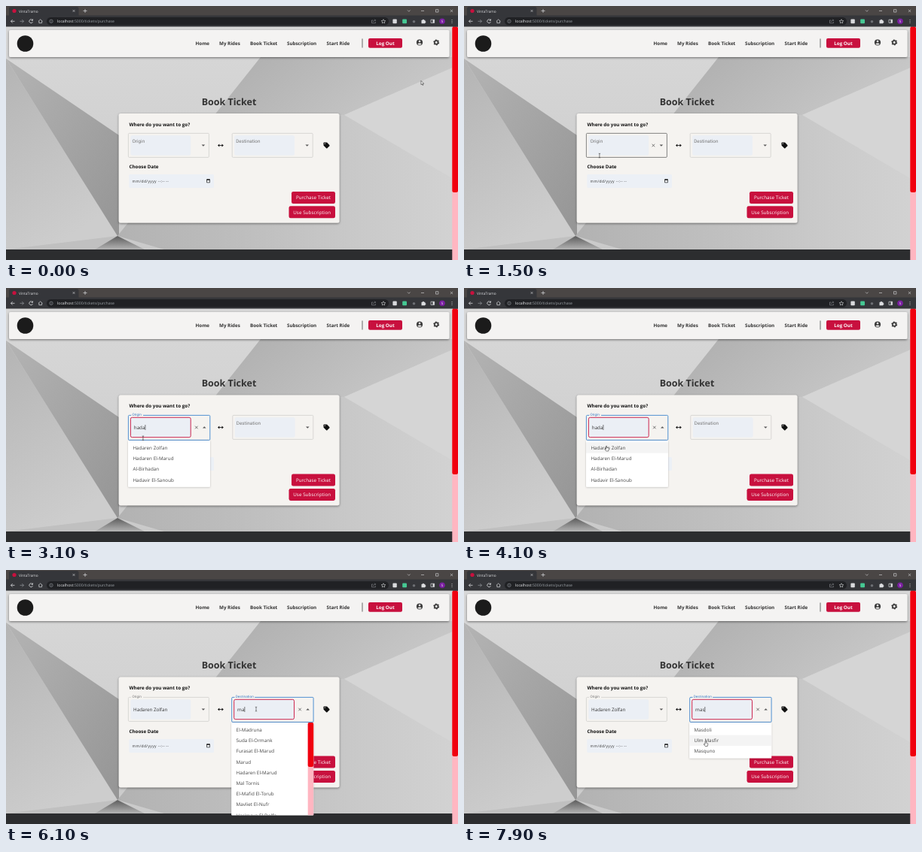
An HTML page for the animation above (8 s loop, 600x338 px).

```html
<!DOCTYPE html>
<html lang="en">
<head>
<meta charset="utf-8">
<title>Book Ticket</title>
<style>
html, body { margin: 0; width: 100%; height: 100%; overflow: hidden; background: #202124; }
svg { display: block; width: 100vw; height: 100vh; }
text { font: 6.25px "Open Sans", sans-serif; white-space: pre; text-rendering: geometricPrecision; }
.b { font-weight: 700; }
.r { font-family: Roboto, sans-serif; letter-spacing: .00938em; }
.m { letter-spacing: .00938em; }
</style>
</head>
<body>
<svg viewBox="0 0 600 338" preserveAspectRatio="none">
  <defs>
    <linearGradient id="base" x2="0" y2="1"><stop stop-color="#d8d8d8"/><stop offset="1" stop-color="#cacaca"/></linearGradient>
    <linearGradient id="shard" x2="1" y2="1"><stop stop-color="#b4b4b4"/><stop offset="1" stop-color="#959595"/></linearGradient>
    <linearGradient id="left" x2=".4" y2="1"><stop stop-color="#b4b4b4"/><stop offset="1" stop-color="#cdcdcd"/></linearGradient>
    <linearGradient id="top" x2="1" y2=".3"><stop stop-color="#adadad"/><stop offset="1" stop-color="#c8c8c8"/></linearGradient>
    <linearGradient id="low" x2="1"><stop stop-color="#b2b2b2"/><stop offset="1" stop-color="#d2d2d2"/></linearGradient>
    <linearGradient id="apex" x2="0" y2="1"><stop stop-color="#5c5c5c"/><stop offset="1" stop-color="#b4b4b4"/></linearGradient>
    <filter id="shade" x="-10%" y="-10%" width="120%" height="130%"><feDropShadow dx="0" dy="1" stdDeviation="1.5" flood-opacity=".5"/></filter>
    <filter id="soft" x="-10%" y="-10%" width="120%" height="130%"><feDropShadow dx="0" dy=".5" stdDeviation=".8" flood-opacity=".25"/></filter>
    <clipPath id="menu"><rect y="203" width="600" height="123.5"/></clipPath>
  </defs>
  <g id="back"></g>
  <g id="live"></g>
</svg>
<script>
const LOOP = 8000, STEP = 100;
const RED = '#c8103e', CARD = '#f5f3f0', INK = '#333', ROW = 14.2;
const STATIONS = ['Zolfan', 'Bir Zolfan', 'Zolfan University', 'Tell Rud', 'Hadaren Zolfan',
  'El-Madruna', 'Suda El-Ormank', 'Lubbifa', 'Suda El-Ganib', 'Furasat El-Marud', 'Marud',
  'Hadaren El-Marud', 'Mal Tornis', 'El-Mafid El-Torub', 'Al-Birhadan', 'Thalun',
  'Mavliet El-Nufr', 'Harimaya El-Dolfa', 'Hadavir El-Sanoub', 'Bir Shaluf', 'El Thanazuri',
  'El Harvolen', 'Masdoli', 'Ulm Masfir', 'Masquno'];
const THUMB = { '': 14, h: 28, ha: 66, m: 25, ma: 59 };
const OPEN_A = 1700, PICK = 4400, OPEN_B = 5150;
const KEYS_A = [[OPEN_A, ''], [2100, 'h'], [2300, 'ha'], [2700, 'had'], [2900, 'hada']];
const KEYS_B = [[OPEN_B, ''], [5400, 'm'], [5600, 'ma'], [6800, 'mas']];
const PATH = [[0, 551, 99.5], [100, 551, 99.5], [200, 528, 103], [300, 528, 103], [1300, 179, 199],
  [1800, 181.5, 199], [3000, 181.5, 199], [3700, 189, 210], [4400, 189, 210], [5000, 332, 185],
  [6900, 332, 185], [7500, 320.5, 227.5]];

const rect = (x, y, w, h, fill, r = 0, more = '') =>
  `<rect x="${x}" y="${y}" width="${w}" height="${h}" rx="${r}" fill="${fill}" ${more}/>`;
const text = (x, y, s, fill = INK, cls = '', style = '') =>
  `<text x="${x}" y="${y}" fill="${fill}" class="${cls}" style="${style}">${s}</text>`;
const line = (d, color, w = .8) =>
  `<path d="${d}" fill="none" stroke="${color}" stroke-width="${w}"/>`;
const area = (d, fill) => `<path d="${d}" fill="${fill}"/>`;
const dot = (x, y, r, fill) => `<circle cx="${x}" cy="${y}" r="${r}" fill="${fill}"/>`;
const cross = (x, y, s, color, w) =>
  line(`M${x - s} ${y - s}l${2 * s} ${2 * s}m0 ${-2 * s}l${-2 * s} ${2 * s}`, color, w);
const mid = 'text-anchor:middle;';

function browser() {
  const pale = '#dcdde0', dim = '#8d9196';
  return rect(0, 0, 600, 13, '#4a4645') + rect(4, 1, 92.5, 14, '#35363a', 2.5) +
    rect(0, 12.5, 600, 15, '#35363a') + dot(11, 6.5, 2.6, RED) +
    text(17, 8.5, 'VintaTramo', pale, '', 'font-size:4.8px') +
    cross(90, 6.5, 1.4, pale, .6) + line('M102.5 6.5h5m-2.5-2.5v5', pale, .7) +
    line('M533 5.5l1.8 1.8l1.8-1.8M551 6.5h4M570.5 4.7h3.4v3.4h-3.4z', pale, .6) + cross(591.5, 6.5, 1.6, pale, .6) +
    rect(54, 15, 454, 10.5, '#202124', 5.2) +
    line('M11.5 20.3h-5m2.2-2.2l-2.2 2.2l2.2 2.2', pale) +
    line('M18.5 20.3h5m-2.2-2.2l2.2 2.2l-2.2 2.2', dim) +
    line('M35 18.6a2.4 2.4 0 1 0 .5 2.4M35.5 17.4v1.9h-1.9', pale) +
    line('M43 20.3l2.7-2.4l2.7 2.4M43.8 20v2.6h3.8v-2.6', pale, .7) +
    '<circle cx="60" cy="20.3" r="2.2" fill="none" stroke="#9aa0a6" stroke-width=".6"/>' +
    line('M60 20v1.4M60 18.9v.5', '#9aa0a6', .6) +
    text(68, 22.2, 'localhost<tspan fill="#9aa0a6">:5000/tickets/purchase</tspan>', '#e8eaed', '', 'font-size:5.15px') +
    line('M487 19h-1.5v3.7h5v-1.5M487.3 21c.3-1.6 1.4-2 3.3-2m-1.3-1.4l1.4 1.4l-1.4 1.4', dim, .6) +
    line('M501 17.7l.8 1.8l2 .2l-1.5 1.3l.4 1.9l-1.7-1l-1.7 1l.4-1.9l-1.5-1.3l2-.2z', pale, .6) +
    rect(513.4, 17.6, 5.4, 5.6, '#d9dadd', 1) + rect(526.2, 17.6, 5.8, 5.6, '#45c893', 1) +
    dot(541.5, 20.8, 1.8, '#6d6f74') +
    area('M551.5 18.8h1.4a1 1 0 0 1 2 0h1.5v1.5a1 1 0 0 1 0 2v1h-4.9z', pale) +
    line('M564 18.2h4.6v4.2h-4.6z', pale, .7) + rect(566.5, 18.2, 2.1, 4.2, pale) +
    dot(579, 20.3, 3.8, '#7b1fa2') + text(579, 22, 'S', '#fff', '', mid + 'font-size:4.5px') +
    dot(592, 18.5, .5, pale) + dot(592, 20.4, .5, pale) + dot(592, 22.3, .5, pale);
}

function backdrop() {
  return rect(0, 27, 593, 298, 'url(#base)') +
    area('M0 70L148 306L0 324z', 'url(#left)') +
    area('M0 70L150 172V306L148 306z', 'url(#shard)') +
    area('M338 68H593V82L449 145L276 146z', 'url(#top)') +
    area('M449 145L593 82V230z', '#d5d5d5') +
    area('M276 146L449 145L593 230V324H210L148 306z', 'url(#low)') +
    area('M0 324L148 306L120 324z', '#c0c0c0') +
    area('M148 306L118 324H184z', 'url(#apex)') +
    rect(0, 324, 593, 14, '#2c2d2f') +
    rect(592.3, 27.5, 7.7, 310.5, '#ffb6c1') + rect(592.3, 27.5, 7.7, 220.5, '#f0000f', 2.5);
}

function navbar() {
  const links = [[251.5, 'Home'], [283, 'My Rides'], [324, 'Book Ticket'], [373, 'Subscription'], [425.5, 'Start Ride']];
  return rect(4, 32, 584.5, 36, '#f4f3f2', 2, 'filter="url(#shade)"') + dot(25.5, 50, 10.8, '#1b1b1b') +
    links.map(([x, s]) => text(x, 51.6, s, INK, 'b')).join('') +
    rect(472.6, 43.5, .8, 12, '#444') + rect(481, 43, 45, 12.7, RED, 2) +
    text(503.5, 51.6, 'Log Out', '#fff', 'b', mid) +
    dot(549, 48.5, 4.1, '#3c3c3c') + dot(549, 47, 1.3, '#f4f3f2') +
    area('M546.4 50.6c.8-1.6 4.4-1.6 5.2 0c-1 1.6-4.2 1.6-5.2 0z', '#f4f3f2') +
    '<circle cx="571.2" cy="48.5" r="2.3" fill="none" stroke="#3c3c3c" stroke-width="1.7"/>' +
    '<circle cx="571.2" cy="48.5" r="3.4" fill="none" stroke="#3c3c3c" stroke-width="1.2" stroke-dasharray="1.78"/>';
}

// The form grows slightly once a field has been opened.
function form(g) {
  const button = (x, y, w, s) => rect(x, y, w, 16, RED, 2.3) + text(x + w / 2, y + 10.2, s, '#fff', 'm', mid);
  const icon = 185.5;
  return text(296, 131.5 - g / 2, 'Book Ticket', INK, 'b', mid + 'font-size:12.5px') +
    rect(149.7, 143 - g / 2, 292.8, 145.5 + g * 1.3, CARD, 2.5, 'filter="url(#shade)"') +
    text(163.5, 159.6 - g / 2, 'Where do you want to go?', '#111', 'b') +
    line(`M282 ${icon}h6`, '#111') +
    area(`M281 ${icon}l2.3-2v4zM288.8 ${icon}l-2.3-2v4z`, '#111') +
    area('M421.5 182.2q0-.8.8-.8h3q.6 0 1 .4l3 3.2q.5.6 0 1.2l-2.9 3q-.6.5-1.2 0l-3.3-3.2q-.4-.4-.4-1z', '#111') +
    dot(423.3, 183.2, .6, CARD) +
    text(163.5, 216.1 + g * .7, 'Choose Date', '#111', 'b') +
    rect(163.3, 224 + g, 112.7, 18, '#ecf0f6', 1.5) +
    text(167.5, 234.7 + g, 'mm/dd/yyyy', INK, '', 'font-size:5px;letter-spacing:.32px') +
    text(201.8, 234.7 + g, '--:-- --', INK, '', 'font-size:5px;letter-spacing:.25px') +
    line(`M266.5 ${231 + g}h4v3.9h-4zM267.4 ${230 + g}v1M269.6 ${230 + g}v1`, '#222', .7) +
    rect(266.3, 230.6 + g, 4.4, 1.3, '#222') +
    button(379, 247 + g * .6, 58, 'Purchase Ticket') + button(375.5, 266.3 + g * .6, 61.5, 'Use Subscription');
}

// f: { focus, hover, value, lift, caret }
function field(x, label, f) {
  const w = f.focus ? 108.4 : 107, h = f.focus ? 33 : 32, k = f.lift;
  const edge = f.focus ? '#3f86cf' : f.hover ? '#555' : '#cdccc9';
  const tip = x + w - 7.5, up = f.focus ? -1 : 1;
  const size = 6.25 - 1.56 * k;
  let s = rect(x, 169.4, w, h, 'none', 1.2, `stroke="${edge}" stroke-width="${f.focus ? .9 : .7}"`);
  if (k) s += rect(x + 3.8, 168.6, label.length * 2.15 + 3, 1.6, CARD);
  s += rect(x + 3, 172.3, 79.8, 26.4, '#ebeff5', 2, f.focus ? `stroke="${RED}" stroke-width=".9"` : '');
  s += text(x + 5, 182.1 - 11.8 * k, label, f.focus && k > .9 ? '#3f7fc4' : '#777', 'r', `font-size:${size}px`);
  if (f.value) s += text(x + (f.focus ? 7.4 : 6.7), 187.7, f.value);
  if (f.caret) s += `<rect id="caret" x="${x + 7.6}" y="182" width=".6" height="7" fill="#222"/>`;
  if (f.focus || f.hover) s += cross(tip - 10.5, 185.5, 1.8, '#555', .8);
  return s + area(`M${tip - 2.3} ${185.5 - up}h4.6l-2.3 ${2.3 * up}z`, '#555');
}

function menu(x, query, tipY) {
  const items = STATIONS.filter(s => s.toLowerCase().includes(query));
  const thumb = THUMB[query];
  const h = thumb ? 123.5 : items.length * ROW + 5;
  const over = tipY > 205 ? Math.floor((tipY - 205.5) / ROW) : -1;
  let s = rect(x, 203, 109, h, '#fff', 1.2, 'filter="url(#soft)"') + '<g clip-path="url(#menu)">';
  items.slice(0, 9).forEach((name, i) => {
    const y = 205.5 + i * ROW;
    if (i === over) s += rect(x, y, 109, ROW, '#f4f4f4');
    s += text(x + 6.4, y + 9.4, name, '#444', 'm');
  });
  if (thumb) s += rect(x + 101.5, 203, 7.5, h, '#ffb6c1') + rect(x + 101.5, 203, 7.5, thumb, '#f0000f', 2);
  return s + '</g>';
}

function pointer(x, y, kind) {
  const shapes = {
    arrow: '<path d="M0 0v5.2l1.2-1.1l.9 1.9l.8-.4l-.8-1.8h1.6z" fill="#fff" stroke="#111" stroke-width=".5"/>',
    beam: line('M-1.2-2.8q1.2 0 1.2.7q0-.7 1.2-.7M0-2.3v4.8M-1.2 3q1.2 0 1.2-.7q0 .7 1.2.7', '#333', .6),
    hand: '<path d="M-.5.4q.6-.8 1.1 0v2l2 .5q.9.3.7 1.2l-.6 2.9h-3l-2-2.6q-.1-1 1.8.2z" fill="#fff" stroke="#111" stroke-width=".5"/>'
  };
  return `<g transform="translate(${x} ${y})">${shapes[kind]}</g>`;
}

function spot(t) {
  const i = PATH.findIndex(p => p[0] > t);
  if (i < 0) return PATH[PATH.length - 1].slice(1);
  const [a, b] = [PATH[i - 1], PATH[i]];
  const u = (t - a[0]) / (b[0] - a[0]), e = u * u * (3 - 2 * u);
  return [a[1] + (b[1] - a[1]) * e, a[2] + (b[2] - a[2]) * e];
}

const lastKey = (keys, t) => keys.filter(k => k[0] <= t).pop() || [0, ''];
const lift = (t, start) => t < start ? 0 : 1 - (1 - Math.min(1, (t - start) / 200)) ** 2.4;
const blink = (t, since) => (t - since) % 1060 < 530;

const live = document.getElementById('live');
document.getElementById('back').innerHTML = backdrop() + browser() + navbar();

function draw(t) {
  const [x, y] = spot(t);
  const onA = t >= OPEN_A && t < PICK, onB = t >= OPEN_B;
  const inside = left => x > left && x < left + 107 && y > 169 && y < 202;
  const [timeA, typedA] = lastKey(KEYS_A, t), [timeB, typedB] = lastKey(KEYS_B, t);
  const a = { focus: onA, hover: inside(162.5), lift: lift(t, OPEN_A),
    value: t >= PICK ? 'Hadaren Zolfan' : typedA, caret: onA && blink(t, timeA) };
  const b = { focus: onB, hover: inside(300), lift: lift(t, OPEN_B),
    value: typedB, caret: onB && blink(t, timeB) };
  const open = onA || onB;
  const kind = open && y > 204 ? 'hand'
    : inside(162.5) && x < 246 || inside(300) && x < 384 ? 'beam' : 'arrow';
  live.innerHTML = form(t >= OPEN_A ? 1 : 0) +
    field(162.4, 'Origin', a) + field(onB ? 299.7 : onA ? 300.8 : 300.2, 'Destination', b) +
    (onA ? menu(162, typedA, y) : '') + (onB ? menu(299.2, typedB, y) : '') + pointer(x, y, kind);
  const caret = document.getElementById('caret');
  const typed = onA ? typedA : typedB;
  if (caret && typed) {
    const label = [...live.querySelectorAll('text')].find(n => n.textContent === typed);
    const box = label.getBBox();
    caret.setAttribute('x', box.x + box.width + .2);
  }
}

let shown = -1;
function tick(now) {
  const t = Math.floor(now % LOOP / STEP) * STEP;
  if (t !== shown) draw(shown = t);
  requestAnimationFrame(tick);
}
draw(0);
requestAnimationFrame(tick);
</script>
</body>
</html>
```
